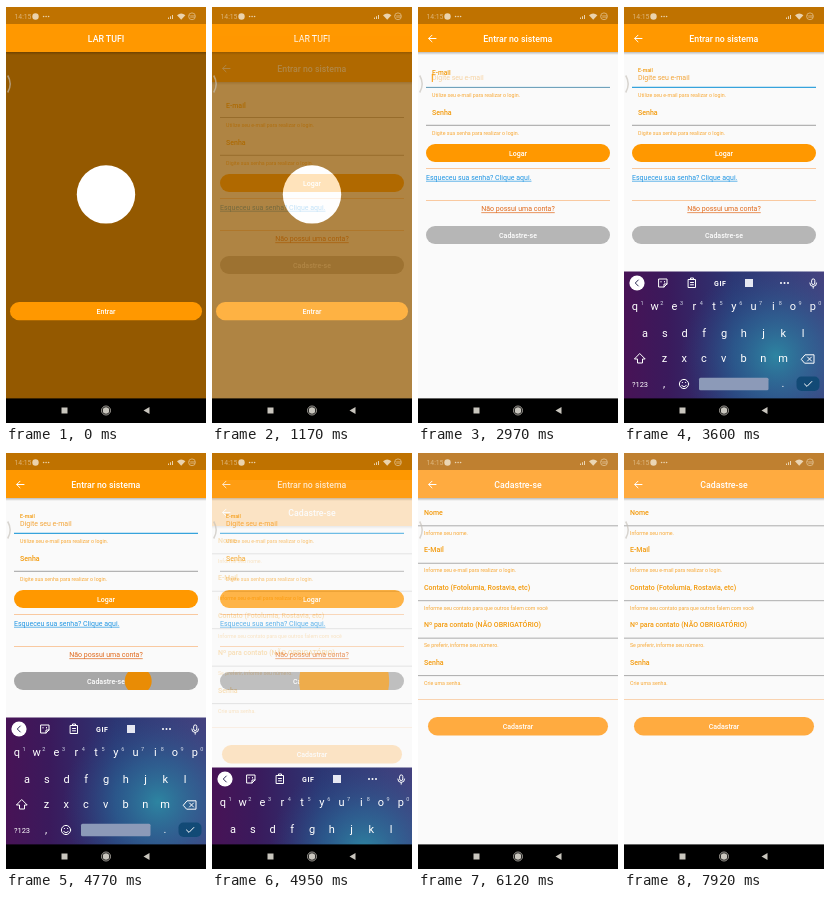
Recreate the animation shown at these times as an HTML page. Size 200x418 px, loop 8000 ms.

```html
<!DOCTYPE html>
<html lang="pt">
<head>
<meta charset="utf-8">
<title>App</title>
<style>
  html, body { margin: 0; width: 100%; height: 100%; overflow: hidden; background: #000; }
  svg { display: block; width: 100%; height: 100%; }
  text { font: 400 7px Roboto, sans-serif; }
  .mid { text-anchor: middle; }
  .title { font-size: 8.75px; font-weight: 500; fill: #fff; text-anchor: middle; }
  .btn { font-weight: 500; fill: #fff; text-anchor: middle; }
  .label { fill: #f39a0c; font-weight: 500; }
  .help { font-size: 5.25px; fill: #f8a834; }
  .key { font-size: 11px; fill: #fff; text-anchor: middle; }
  .digit { font-size: 5.5px; fill: #d5dcea; text-anchor: middle; }
  .line { fill: none; stroke: #fff; stroke-width: 1; stroke-linecap: round; stroke-linejoin: round; }

  /* Every motion advances in 90 ms ticks (1.125% of the loop). */
  .anim { animation: 8s step-end -4ms infinite; }
  #login { animation-name: login; }
  #signup { animation-name: signup; }
  #keyboard { animation-name: keyboard; }
  #float { animation-name: float; }
  #hint { animation-name: hint; }
  #focus { animation-name: focus; }
  #caret { animation-name: caret; }
  #ripple { animation-name: ripple; }
  #press { animation-name: press; }

  @keyframes login {
    0% { opacity: 0; transform: translateY(104px); }
    13.5% { opacity: .03; transform: translateY(100px); }
    14.625% { opacity: .27; transform: translateY(30px); }
    15.75% { opacity: .62; transform: translateY(7px); }
    16.875%, 100% { opacity: 1; transform: none; }
  }
  @keyframes signup {
    0% { opacity: 0; transform: translateY(104px); }
    60.75% { opacity: .04; transform: translateY(98px); }
    61.875% { opacity: .29; transform: translateY(28px); }
    63% { opacity: .65; transform: translateY(6px); }
    64.125%, 100% { opacity: 1; transform: none; }
  }
  @keyframes keyboard {
    0% { transform: translateY(160px); }
    39.375% { transform: translateY(75px); }
    40.5% { transform: translateY(22px); }
    41.625% { transform: none; }
    61.875% { transform: translateY(50px); }
    63%, 100% { transform: translateY(160px); }
  }
  @keyframes float {
    0% { transform: translate(14px, 71.5px); }
    37.125% { transform: translate(14px, 69.5px) scale(.95); }
    38.25% { transform: translate(14px, 66.8px) scale(.8); }
    39.375%, 100% { transform: translate(14px, 66px) scale(.75); }
  }
  @keyframes hint {
    0% { opacity: 0; }
    37.125% { opacity: .45; }
    38.25% { opacity: .85; }
    39.375%, 100% { opacity: 1; }
  }
  @keyframes focus {
    0% { opacity: 0; }
    37.125% { opacity: .45; }
    38.25%, 100% { opacity: 1; }
  }
  @keyframes caret {
    0% { opacity: 0; }
    37.125% { opacity: 1; }
    43.875% { opacity: 0; }
    50.625% { opacity: 1; }
    56.25%, 100% { opacity: 0; }
  }
  @keyframes ripple {
    0% { r: 0; }
    58.5% { r: 6px; }
    59.625% { r: 13.5px; }
    60.75% { r: 25px; }
    61.875%, 100% { r: 45px; }
  }
  @keyframes press {
    0% { opacity: 0; }
    58.5%, 100% { opacity: .08; }
  }
</style>
</head>
<body>
<svg viewBox="0 0 200 418" preserveAspectRatio="none">
  <defs>
    <linearGradient id="shade" x2="0" y2="1">
      <stop stop-color="#000" stop-opacity=".25"/>
      <stop offset="1" stop-color="#000" stop-opacity="0"/>
    </linearGradient>
    <linearGradient id="keys">
      <stop stop-color="#481356"/>
      <stop offset=".22" stop-color="#3a1a5c"/>
      <stop offset=".55" stop-color="#2c3673"/>
      <stop offset="1" stop-color="#45427f"/>
    </linearGradient>
    <radialGradient id="glow" gradientUnits="userSpaceOnUse" cx="152" cy="350" r="95">
      <stop stop-color="#2c8da6" stop-opacity=".9"/>
      <stop offset=".45" stop-color="#2a6c9a" stop-opacity=".6"/>
      <stop offset="1" stop-color="#2a4a88" stop-opacity="0"/>
    </radialGradient>
    <clipPath id="pill"><rect x="8" y="220" width="184" height="18" rx="9"/></clipPath>
    <path id="back" class="line" d="M18 32.5H10.8M14 29.2L10.7 32.5L14 35.8"/>
  </defs>

  <g id="home">
    <rect width="200" height="418" fill="#945900"/>
    <rect y="46" width="200" height="3" fill="url(#shade)"/>
    <rect width="200" height="46" fill="#ff9800"/>
    <text class="title" x="100" y="35.5">LAR TUFI</text>
    <circle cx="100" cy="188.4" r="29.2" fill="#fff"/>
    <rect x="4" y="296" width="192" height="18.3" rx="9.15" fill="#ff9800"/>
    <text class="btn" x="100" y="307.8">Entrar</text>
  </g>

  <g id="login" class="anim">
    <rect width="200" height="418" fill="#fafafa"/>
    <rect y="46" width="200" height="3" fill="url(#shade)"/>
    <rect width="200" height="46" fill="#ff9800"/>
    <use href="#back"/>
    <text class="title" x="99.8" y="35.5">Entrar no sistema</text>

    <text id="float" class="label anim">E-mail</text>
    <text id="hint" class="anim" x="14" y="74.3" fill="#f3a437">Digite seu e-mail</text>
    <rect id="caret" class="anim" x="13.8" y="68" width="1" height="8" fill="#ff9800"/>
    <path d="M8 81.5H192" stroke="#8c8c8c" stroke-width=".8"/>
    <path id="focus" class="anim" d="M8 81.4H192" stroke="#36a3dc" stroke-width="1.3"/>
    <text class="help" x="14" y="91">Utilize seu e-mail para realizar o login.</text>
    <text class="label" x="14" y="108.5">Senha</text>
    <path d="M8 119.3H192" stroke="#8c8c8c" stroke-width=".8"/>
    <text class="help" x="14" y="128.8">Digite sua senha para realizar o login.</text>

    <rect x="8" y="138" width="184" height="18" rx="9" fill="#ff9800"/>
    <text class="btn" x="100" y="149.6">Logar</text>
    <path d="M8 162.5H192M8 194.5H192" stroke="#f9c9a0"/>
    <text x="8" y="173.8" fill="#2196e3" text-decoration="underline">Esqueceu sua senha? Clique aqui.</text>
    <text class="mid" x="100" y="205.4" fill="#e0691c" text-decoration="underline">Não possui uma conta?</text>

    <g clip-path="url(#pill)">
      <rect x="8" y="220" width="184" height="18" fill="#b6b6b6"/>
      <rect id="press" class="anim" x="8" y="220" width="184" height="18"/>
      <text class="btn" x="100" y="231.6">Cadastre-se</text>
      <circle id="ripple" class="anim" cx="132.2" cy="229" r="0" fill="#e98c05"/>
    </g>
  </g>

  <g id="signup" class="anim">
    <rect width="200" height="418" fill="#fafafa"/>
    <rect y="46" width="200" height="3" fill="url(#shade)"/>
    <rect width="200" height="46" fill="#ffab40"/>
    <use href="#back"/>
    <text class="title" x="100" y="35.5">Cadastre-se</text>
    <g id="fields"></g>
    <path d="M0 247.5H200" stroke="#f9d3b0"/>
    <rect x="10" y="265" width="180" height="18.5" rx="9.25" fill="#ffab40"/>
    <text class="btn" x="100" y="276.9">Cadastrar</text>
  </g>

  <g id="keyboard" class="anim">
    <rect y="265.5" width="200" height="153" fill="url(#keys)"/>
    <rect y="265.5" width="200" height="153" fill="url(#glow)"/>
    <circle cx="13" cy="277" r="7.6" fill="#fff"/>
    <path class="line" d="M14.3 274L11.3 277L14.3 280" style="stroke:#2c2c55"/>
    <g class="line">
      <path d="M35 273H43V278L40 281H35ZM40 281V278H43M37 275.5V276M40.5 275.5V276"/>
      <path d="M64.5 273.5H71.5V281.5H64.5ZM66.5 273V272H69.5V273M66.5 276.5H69.5M66.5 278.8H69.5"/>
      <path d="M187.6 274.5a1.6 1.6 0 0 1 3.2 0v2.5a1.6 1.6 0 0 1-3.2 0ZM185.8 277a3.4 3.4 0 0 0 6.8 0M189.2 280.5V282.2"/>
      <path d="M16 347.8L21.2 353H18.5V357H13.5V353H10.8Z"/>
      <path d="M177.5 353L181 348.8H190V357.2H181ZM183.5 351L187.5 355M187.5 351L183.5 355"/>
      <circle cx="60" cy="378" r="4.6"/>
      <path d="M57.8 379.3a2.4 2.4 0 0 0 4.4 0M58.4 376.4V376.6M61.6 376.4V376.6"/>
    </g>
    <rect x="121" y="273" width="8" height="8" fill="#e6e8f2"/>
    <text class="btn" x="96.3" y="279.5" style="font-weight:700;letter-spacing:.6px">GIF</text>
    <g fill="#fff"><circle cx="157" cy="277" r="1"/><circle cx="160.5" cy="277" r="1"/><circle cx="164" cy="277" r="1"/></g>
    <text class="key" x="16" y="380.6" style="font-size:7.5px">?123</text>
    <text class="key" x="40" y="381">,</text>
    <rect x="75" y="371.8" width="69.5" height="12.4" rx="1.5" fill="#8c9ab8"/>
    <text class="key" x="159" y="381">.</text>
    <rect x="172.5" y="370.5" width="23" height="14.5" rx="5" fill="#124a76"/>
    <path class="line" d="M180.5 378L183 380.4L187.8 375.5"/>
  </g>

  <path d="M1.7 69.5Q6.7 78 1.7 86.5" fill="none" stroke="#c4c0b8" stroke-opacity=".65" stroke-width="1.5"/>

  <rect width="200" height="18" fill="#000" fill-opacity=".25"/>
  <g fill="#f2e4cc" opacity=".85">
    <text x="8.5" y="13" style="font-size:6.8px;fill:#e2c08c">14:15</text>
    <circle cx="29.5" cy="10.5" r="3.2"/>
    <circle cx="37.6" cy="10.5" r=".8"/><circle cx="40.1" cy="10.5" r=".8"/><circle cx="42.6" cy="10.5" r=".8"/>
    <path d="M162 13V11.5H163V13ZM164 13V10.3H165V13ZM166 13V9H167V13Z"/>
    <path d="M171 9.3Q175.2 5.8 179.4 9.3L175.2 13.8Z"/>
    <circle cx="186" cy="10.3" r="3.4" fill="none" stroke="#e9cfa2" stroke-width=".8"/>
    <text class="mid" x="186" y="11.8" style="font-size:3.6px">100</text>
  </g>

  <rect y="392.4" width="200" height="26"/>
  <g fill="#c9c6be">
    <rect x="55.5" y="401.5" width="6" height="6"/>
    <circle cx="100" cy="404.5" r="3.2"/>
    <circle cx="100" cy="404.5" r="4.5" fill="none" stroke="#c9c6be" stroke-width=".8"/>
    <path d="M137.5 404.5L143.5 401V408Z"/>
  </g>
  <path d="M0 .5H200M0 417.5H200" stroke="#fff"/>
</svg>
<script>
  const text = (cls, x, y, s) => `<text class="${cls}" x="${x}" y="${y}">${s}</text>`;

  const fields = [
    ["Nome", "Informe seu nome."],
    ["E-Mail", "Informe seu e-mail para realizar o login."],
    ["Contato (Fotolumia, Rostavia, etc)", "Informe seu contato para que outros falem com você"],
    ["Nº para contato (NÃO OBRIGATÓRIO)", "Se preferir, informe seu número."],
    ["Senha", "Crie uma senha."],
  ];
  document.getElementById("fields").innerHTML = fields.map(([label, help], i) => {
    const y = 60.3 + i * 37.45;
    return text("label", 6, y + 2.5, label) +
      `<path d="M0 ${y + 13.5}H200" stroke="#989898" stroke-width=".8"/>` +
      text("help", 6, y + 22.7, help);
  }).join("");

  const rows = [["qwertyuiop", 11, 304], ["asdfghjkl", 21, 330.5], ["zxcvbnm", 40.5, 356]];
  const letters = rows.flatMap(([row, left, y]) =>
    [...row].map((c, i) => text("key", left + i * 19.75, y, c)));
  const digits = [..."1234567890"].map((c, i) => text("digit", 18 + i * 19.75, 298.5, c));
  document.getElementById("keyboard").insertAdjacentHTML("beforeend", [...letters, ...digits].join(""));
</script>
</body>
</html>
```
